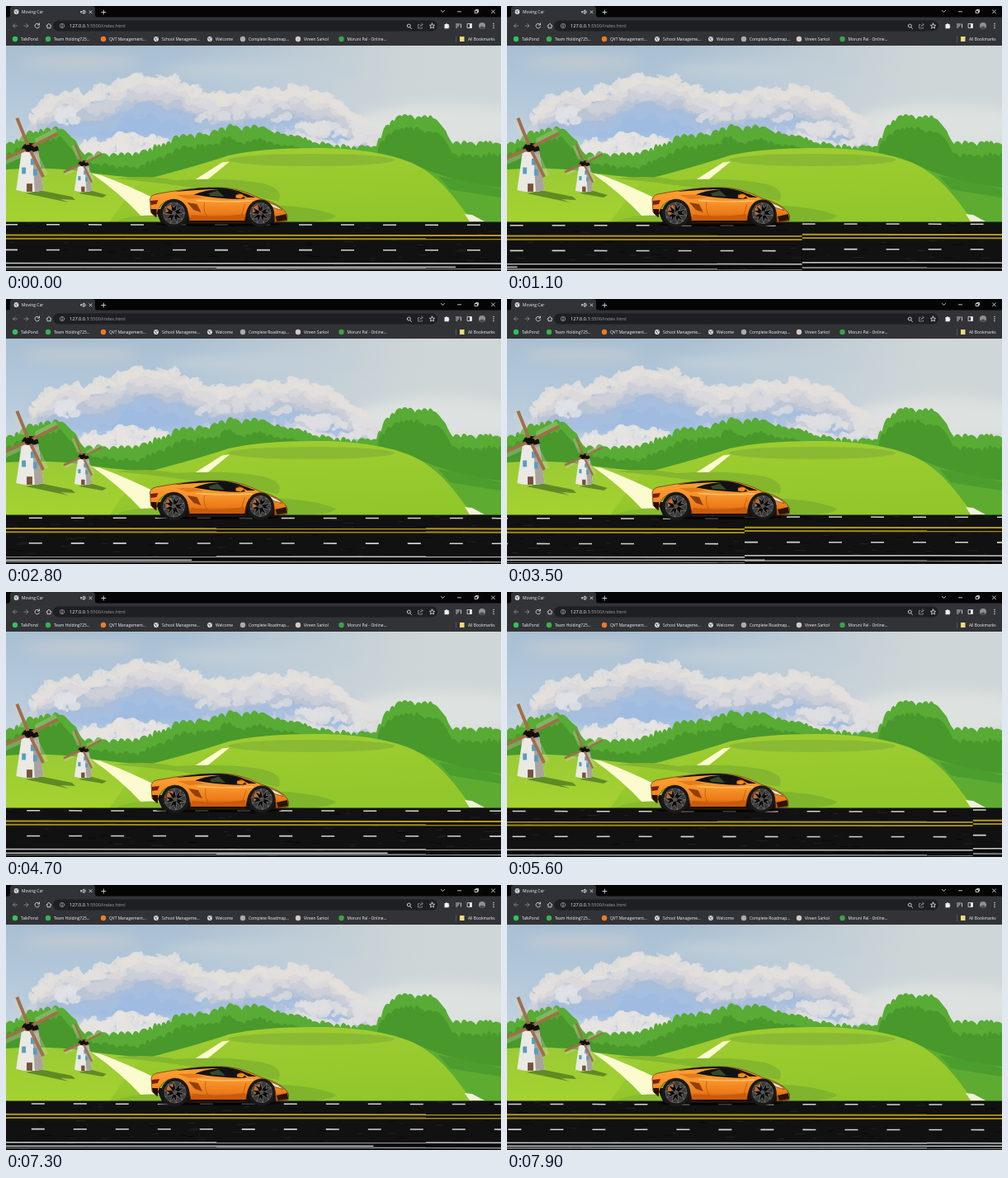
An HTML page for the animation above (8000 ms loop, 600 by 321 pixels).

```html
<!DOCTYPE html>
<html lang="en">
<head>
<meta charset="utf-8">
<title>Moving Car</title>
<style>
  html, body { margin: 0; width: 100%; height: 100%; overflow: hidden; background: #000; }
  svg { display: block; width: 100vw; height: 100vh; }
  text { font-family: "Open Sans", "Noto Sans", sans-serif; font-weight: 500; fill: #f4f5f6; }
  .icon { fill: none; stroke: #d5d7da; stroke-width: .9; stroke-linecap: round; stroke-linejoin: round; }
  .dim { stroke: #85888c; }
</style>
</head>
<body>
<svg viewBox="0 0 600 321" preserveAspectRatio="none">
  <defs>
    <linearGradient id="sky" x2="0" y2="1">
      <stop offset="0" stop-color="#a9bfd2"/><stop offset=".3" stop-color="#b3c8da"/>
      <stop offset="1" stop-color="#dde3e6"/>
    </linearGradient>
    <linearGradient id="haze">
      <stop offset=".35" stop-color="#d3d8d7" stop-opacity="0"/><stop offset=".85" stop-color="#cfd6d7"/>
    </linearGradient>
    <linearGradient id="field" x2="0" y2="1">
      <stop offset="0" stop-color="#9acb35"/><stop offset="1" stop-color="#a5d230"/>
    </linearGradient>
    <linearGradient id="hill" x2=".2" y2="1">
      <stop offset="0" stop-color="#a0cd31"/><stop offset="1" stop-color="#91c72b"/>
    </linearGradient>
    <linearGradient id="paint" x2="0" y2="1">
      <stop offset="0" stop-color="#ffa437"/><stop offset=".45" stop-color="#f7922a"/>
      <stop offset=".75" stop-color="#ec7a18"/><stop offset="1" stop-color="#a8480c"/>
    </linearGradient>
    <filter id="billow" x="-10%" y="-20%" width="120%" height="140%">
      <feTurbulence type="fractalNoise" baseFrequency=".06" numOctaves="3" seed="4"/>
      <feDisplacementMap in="SourceGraphic" scale="14" xChannelSelector="R" yChannelSelector="G"/>
      <feGaussianBlur stdDeviation=".6"/>
    </filter>
    <filter id="softer" x="-20%" y="-40%" width="140%" height="180%"><feGaussianBlur stdDeviation="7"/></filter>
    <clipPath id="roadClip"><rect y="261.5" width="600" height="60"/></clipPath>
    <clipPath id="skyClip"><rect y="48" width="600" height="214"/></clipPath>
  </defs>

  <g clip-path="url(#skyClip)">
    <rect y="48" width="600" height="214" fill="url(#sky)"/>
    <rect y="48" width="600" height="214" fill="url(#haze)"/>
    <g id="clouds"></g>
    <g id="woods"></g>

    <!-- meadow -->
    <path d="M0 198C45 195 85 198 110 203C170 211 240 214 330 222V262H0Z" fill="url(#field)"/>
    <path d="M500 194Q545 214 600 220V262H540Z" fill="#5dac31"/>
    <path d="M524 206Q560 212 600 222V232Q560 226 538 222Z" fill="#4b9d2d"/>
    <path d="M125 262Q150 226 165 211Q225 196 270 181Q310 172 375 172C430 172 472 180 498 193C530 210 546 236 566 262Z" fill="url(#hill)"/>
    <ellipse cx="370" cy="186.500" rx="101" ry="7.500" fill="#8aba33"/>
    <path d="M262 189.500L271 188.500L241 213H225Z" fill="#fbfbcf"/>
    <path d="M132 209Q170 204 206 211Q270 207 312 215Q338 222 330 236Q270 224 226 220Q180 213 132 209Z" fill="#84b62e"/>
    <path d="M104 203L114 204.500Q150 218 186 236V258H167Q140 228 104 203Z" fill="#fbfbcf"/>
    <path d="M300 241Q372 241 400 254Q396 262 340 262H300Z" fill="#7fb52d"/>
    <path d="M140 258Q160 252 190 254V262H132Z" fill="#88bb2e"/>
    <path d="M556 252L565 253L580 261H562Z" fill="#f2f0dc"/>

    <!-- windmills -->
    <path d="M40 223L80 231L84 235L66 234L76 238L24 227Z" fill="#5f8a25"/>
    <path d="M101 223L122 229L117 232L88 227Z" fill="#5f8a25"/>
    <g id="mills"></g>
  </g>

  <g clip-path="url(#roadClip)">
    <g id="road"></g>
    <rect id="bar" y="315.5" height="1.5" fill="#c2c4c4"/>
  </g>

  <!-- car -->
  <g id="car">
    <ellipse cx="258" cy="264.500" rx="76" ry="2.500" fill="#000" opacity=".7"/>
    <path d="M182 246H330V261L320 264H190Z" fill="#15110e"/>
    <path d="M176 234Q177 228 188 227C210 223 232 220 258 220C279 220 295 226 309 233C328 238 340 246 342.500 254L342 260L327 262Q328 236 309 235Q292 237 291 262H224Q222 235 204 234Q186 236 183 256L177 250Z" fill="url(#paint)" stroke="#5d2c08" stroke-width=".7"/>
    <path d="M206 225C225 220.500 245 219.500 260 220C278 220.500 291 227 304 232L294 232C282 225 268 222 251 222Q230 223 206 225Z" fill="#1d1510"/>
    <path d="M229 228.500C244 222 262 221.500 272 222.500Q283 225 292 233L285 234Q258 233.500 229 228.500Z" fill="#101214"/>
    <path d="M247 227L258 223.500L266 231L249 230Z" fill="#39472a"/>
    <path d="M270 224L276 233" stroke="#101214" stroke-width="1.500"/>
    <path d="M280 229Q288 226 290 230.500L286 233.500L280 232.500Z" fill="#f98b17" stroke="#713407" stroke-width=".5"/>
    <path d="M208 229L228 228.500L242 232.500L222 234Z" fill="#e37c1b"/>
    <path d="M221 238L233 240L238 250L229 247Z" fill="#8f3f0a"/>
    <path d="M232 235.500Q264 238 300 236" fill="none" stroke="#ffc46a" stroke-width="1.300"/>
    <path d="M242 238Q240 250 247 257H286L291 240" fill="none" stroke="#a64b08" stroke-width=".6"/>
    <path d="M226 253Q258 257 290 252V261H225Z" fill="#c95b0d"/>
    <path d="M224 261H292" stroke="#1a0d06" stroke-width="2"/>
    <path d="M318 238Q331 241 336 247.500L326 244.500Z" fill="#eee5c9" stroke="#4c2d14" stroke-width=".6"/>
    <path d="M328 255L341 252L342 259L330 261Z" fill="#291508"/>
    <path d="M176.500 236L186 235L184 240L177 241Z" fill="#7a210b"/>
    <path d="M177 246L184 246V256L178 251Z" fill="#201009"/>
  </g>

  <!-- browser frame -->
  <rect width="600" height="14" fill="#050506"/>
  <path d="M2 14Q5 14 5 10V3Q5 0 9 0H104Q108 0 108 3V10Q108 14 111 14Z" fill="#323337"/>
  <rect y="13.500" width="600" height="34.500" fill="#323337"/>
  <rect x="57" y="17.500" width="466" height="13" rx="6.500" fill="#1e1f22"/>
  <g class="icon">
    <path d="M91 6.500H92.500L94.500 5V9.500L92.500 8H91ZM96 5.800Q97 7.200 96 8.600M101 5.800L104 8.800M104 5.800L101 8.800M115.800 7.500H120.800M118.300 5V10"/>
    <path d="M527.500 5.500L529.500 7.500L531.500 5.500M547.500 6.800H551.500M568.500 5.500H571.500V8.500H568.500ZM569.500 5.500V4.500H572.500V7.500H571.500M588.500 4.800L592.500 8.800M592.500 4.800L588.500 8.800"/>
    <path class="dim" d="M13.500 24H8.500M10.800 21.700L8.500 24L10.800 26.300M22 24H27M24.700 21.700L27 24L24.700 26.300M501 22.500H499.500V27H504.500V26M501.500 25Q502 22.500 505 22.500M503.500 21L505.200 22.500L503.500 24"/>
    <path d="M40.200 22.500A2.800 2.800 0 1 0 40.500 25M40.500 21V23H38.500M49 24L52 21.300L55 24M50 23.700V26.700H54V23.700"/>
    <path d="M489.700 25.700L491.500 27.500M486.300 24a2 2 0 1 0 4 0a2 2 0 1 0 -4 0"/>
    <path d="M516.500 21L517.400 23.100L519.600 23.300L518 24.700L518.500 27L516.500 25.800L514.500 27L515 24.700L513.400 23.300L515.600 23.100Z"/>
    <path d="M545.500 22H550M545.500 24H549M545.500 26H547M551.500 22V26M559.500 21.500H564.500V26.500H559.500Z"/>
    <circle class="dim" cx="68" cy="24" r="2.700"/><path d="M68 24V25.300M68 22.600V22.700"/>
  </g>
  <path d="M562 21.500H564.500V26.500H562ZM531.500 22H533Q534 19.800 535 22H536.700V24Q538.500 24.800 536.700 25.700V27.200H531.500Z" fill="#eceef0"/>
  <circle cx="577" cy="24" r="4" fill="#8f918e"/>
  <path d="M573.800 26.400Q577 22.500 580.200 26.400Q577 30 573.800 26.400Z" fill="#494d50"/>
  <path d="M591 21.500V27" stroke="#eceef0" stroke-width="1.400" stroke-linecap="round" stroke-dasharray="0 2.500"/>
  <path d="M545.500 36.500V44" stroke="#606367" stroke-width=".7"/>
  <path d="M550 37H555.500V43H550Z" fill="#f5d97a"/>
  <text x="19" y="9.200" font-size="5">Moving Car</text>
  <text x="77" y="26" font-size="5.600">127.0.0.1<tspan fill="#9aa0a6">:5500/index.html</tspan></text>
  <g id="marks" font-size="4.900"></g>
</svg>

<script>
const LOOP = 8000, STEP = 100;
const TILE = 2700, SPEED = 1.154, SEAM = 1627;

const $ = id => document.getElementById(id);

function add(parent, tag, attrs, text) {
  const node = document.createElementNS("http://www.w3.org/2000/svg", tag);
  for (const k in attrs) node.setAttribute(k, attrs[k]);
  if (text) node.textContent = text;
  parent.append(node);
  return node;
}

let seed = 7;
const rnd = () => (seed = seed * 16807 % 2147483647) / 2147483647;
const between = (a, b) => a + rnd() * (b - a);

// Height of an outline through a few key points
function lerp(points, x) {
  const i = Math.max(1, points.findIndex(p => p[0] >= x));
  const [x0, y0] = points[i - 1], [x1, y1] = points[i];
  return y0 + (y1 - y0) * (x - x0) / (x1 - x0);
}

// Bookmarks row
function globe(x, y) {
  add($("marks"), "circle", { cx: x, cy: y, r: 2.9, fill: "#e3e5e7" });
  add($("marks"), "path", { d: `M${x - 2} ${y - 1}l2 .4l-.6 1.400l1.600 1M${x + .6} ${y - 2}l1.400 1.200`,
    fill: "none", stroke: "#44464a", "stroke-width": .8 });
}
const marks = [
  [18, "TalkPond", "#2fc45a"], [58, "Team Holding725...", "#35b44a"], [125, "QVT Management...", "#ee7b24"],
  [189, "School Manageme..."], [254, "Welcome"], [294, "Complete Roadmap...", "#a9abae"],
  [361, "Vireen Sarkol", "#d8c9bf"], [413.500, "Moruni Pal - Online...", "#3aa547"]
];
for (const [x, label, color] of marks) {
  if (color) add($("marks"), "circle", { cx: x - 7, cy: 40, r: 3.2, fill: color });
  else globe(x - 7, 40);
  add($("marks"), "text", { x, y: 41.7 }, label);
}
add($("marks"), "text", { x: 560, y: 41.7 }, "All Bookmarks");
globe(12.5, 7);

// Clouds: puffs turn from cream to blue with depth below the top outline
const cloudTop = [[28, 130], [50, 104], [125, 94], [150, 78], [205, 82], [250, 104], [350, 92], [400, 106], [456, 150]];
const glow = add($("clouds"), "g", { filter: "url(#softer)" });
const puffs = add($("clouds"), "g", { filter: "url(#billow)" });
const tones = ["#e4e0dc", "#dcdadb", "#cdd0d8", "#bcc6d6", "#a9bedb", "#a6bfe0"];
const blob = (g, cx, cy, rx, ry, fill, opacity = 1) => add(g, "ellipse", { cx, cy, rx, ry, fill, opacity });
blob(glow, 90, 68, 70, 7, "#c3cbd1");
blob(glow, 310, 78, 120, 9, "#c1cfd8");
blob(glow, 150, 138, 120, 28, "#9fbbe0");
blob(glow, 340, 145, 100, 30, "#c6cedb");
blob(glow, 530, 145, 110, 26, "#dde1df");
for (let depth = 5; depth >= 0; depth--)
  for (let x = 32; x < 452; x += 5) {
    const r = between(4, 9);
    blob(puffs, x, lerp(cloudTop, x) + r + depth * 8 + between(0, 6), r, r * .85, tones[depth], .8);
  }
function bank(x0, x1, y0, y1, count, color) {
  while (count--) blob(puffs, between(x0, x1), between(y0, y1), between(4, 9), between(3, 6), color, .8);
}
bank(60, 86, 128, 138, 14, "#dfe1e6");
bank(88, 190, 158, 182, 70, "#e6e3e1");
bank(230, 340, 118, 140, 22, "#d8d9de");
bank(350, 446, 140, 172, 50, "#dedfe1");

// Woods: scalloped strips of foliage
function woods(points, base, fill, drop = 0) {
  const end = points[points.length - 1][0];
  let x = points[0][0], d = `M${x} ${base}L${x} ${lerp(points, x) + drop}`;
  while (x < end) {
    const w = Math.min(between(5, 11), end - x);
    const y = lerp(points, x + w) + drop + between(-1, 4);
    d += `Q${x + w * .4} ${y - between(4, 9)} ${x + w} ${y}`;
    x += w;
  }
  add($("woods"), "path", { d: d + `V${base}Z`, fill });
}
const LIGHT = "#58ab34", DARK = "#48982c";
const left = [[0, 168], [34, 153], [72, 147], [96, 178], [160, 181], [215, 158], [250, 156], [272, 144],
  [290, 153], [303, 146], [330, 152], [395, 169], [470, 172]];
const right = [[448, 178], [460, 146], [482, 133], [520, 137], [536, 150], [542, 168], [600, 164]];
woods(left, 222, LIGHT);
woods(left, 222, DARK, 14);
woods(right, 230, LIGHT);
woods(right, 230, DARK, 15);

// Windmills, drawn once and reused at two sizes
function mill(x, y, s) {
  const g = add($("mills"), "g", { transform: `translate(${x} ${y}) scale(${s})` });
  add(g, "path", { d: "M-9 2L-16 52Q1 57 18 52L11 2Z", fill: "#eae9e4" });
  add(g, "path", { d: "M4 2L7 54Q13 53.500 18 52L11 2Z", fill: "#a9a49b" });
  add(g, "path", { d: "M-3 44H4V54H-3Z", fill: "#765239" });
  for (const [wx, wy] of [[2, 13], [-9, 24], [5, 26]])
    add(g, "rect", { x: wx, y: wy, width: 5, height: 8, fill: "#5b9dc1" });
  add(g, "path", { d: "M-9 3Q-9 -6 1 -6Q11 -6 12 3Q1 7 -9 3Z", fill: "#15120f" });
  for (const a of [-112, -27, 64, 156]) {
    const b = add(g, "g", { transform: `rotate(${a})` });
    add(b, "path", { d: "M8 0H40V-7H12Z", fill: "#d6d5c5", opacity: .3 });
    add(b, "path", { d: "M0 0H40", stroke: "#a06f48", "stroke-width": 4 });
  }
  add(g, "ellipse", { rx: 6, ry: 4, fill: "#100e0c" });
}
mill(28, 172, .98);
mill(93, 191, .63);

// Road: one long, slightly tilted tile shown twice
function roadTile(x) {
  const g = add($("road"), "g", { transform: `translate(${x})` });
  add(g, "rect", { y: 261, width: TILE, height: 60, fill: "#121112" });
  for (let i = 0; i < 400; i++)
    add(g, "rect", { x: rnd() * TILE, y: between(262, 320), width: between(2, 14), height: .6,
      fill: rnd() < .5 ? "#2b2b2b" : "#050505" });
  const line = (y, stroke, w, dash = "none") => add(g, "path", {
    d: `M0 ${y - 1}L${TILE} ${y + 1}`, stroke, "stroke-width": w, "stroke-dasharray": dash });
  line(265, "#d2d2d0", 1.5, "16 35");
  line(277.8, "#b39a16", 2);
  line(282, "#a38c12", 2);
  line(295.6, "#d2d2d0", 1.6, "16 35");
  line(311.7, "#c6c7c6", 1.5);
  line(314.5, "#030303", 1.5);
  line(318, "#a3a5a4", 1.3);
}
roadTile(0);
roadTile(-TILE);

// Wheels
function wheel(cx, cy, r) {
  const g = add($("car"), "g", { transform: `translate(${cx} ${cy}) scale(${r / 17})` });
  add(g, "circle", { r: 17, fill: "#19191a" });
  add(g, "circle", { r: 13, fill: "#3a3a3a", stroke: "#5d5b57", "stroke-width": .8 });
  add(g, "path", { d: "M-10 -5Q-8 -10 -3 -10L-2 -5Q-6 -4 -6 1L-10 2Z", fill: "#db6516" });
  const spin = add(g, "g", {});
  for (let a = 0; a < 360; a += 72)
    add(spin, "path", { d: "M-2 0L-4 -12.500L0 -7L4 -12.500L2 0Z",
      fill: "#0a0a0b", stroke: "#8a8782", "stroke-width": .6, transform: `rotate(${a})` });
  add(g, "circle", { r: 2.5, fill: "#55534f" });
  return spin;
}
const wheels = [wheel(205, 251, 17), wheel(310, 251, 16.4)];

// The bottom bar fills slowly, then starts over at a quicker pace
function barWidth(t) {
  if (t < 1000) return Math.min(600, 545 + .122 * t);
  return t < 5600 ? .125 * (t - 1000) : .262 * (t - 5600);
}

function draw() {
  const n = Math.floor(performance.now() % LOOP / STEP), t = n * STEP;
  const x = ((SEAM - SPEED * t) % TILE + TILE) % TILE;
  $("road").setAttribute("transform", `translate(${x.toFixed(2)})`);
  $("bar").setAttribute("width", barWidth(t));
  $("car").setAttribute("transform", `translate(${n % 2 ? 0 : -1.5})`);
  for (const w of wheels) w.setAttribute("transform", `rotate(${n * 47 % 360})`);
  requestAnimationFrame(draw);
}
draw();
</script>
</body>
</html>
```
